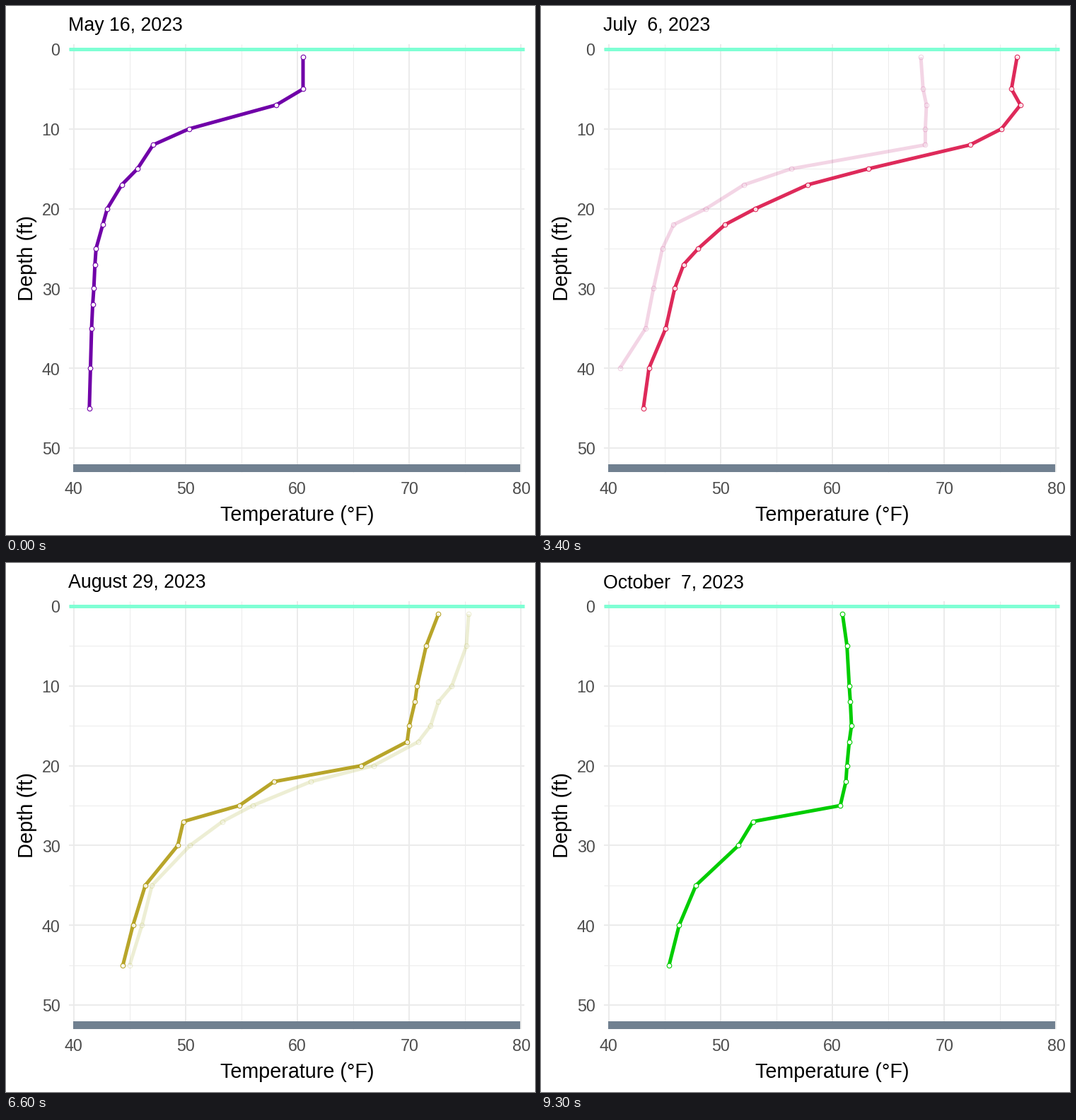
Animation of 748 by 748 pixels, one loop 10000 ms. Source, as a matplotlib script:

```python
import matplotlib.pyplot as plt
from matplotlib.animation import FuncAnimation
from matplotlib.patches import Rectangle

SIZE, DPI = 748, 100
PT = 72 / DPI  # points per pixel
plt.rcParams["font.family"] = "Liberation Sans"

GRID, TICK = "#EBEBEB", "#4D4D4D"
LEFT, RIGHT, TOP, BOTTOM = 89, 733.5, 54, 659

DEPTHS = [1, 5, 7, 10, 12, 15, 17, 20, 22, 25, 27, 30, 32, 35, 40, 45]
NA = None

# date, line colour, temperature at each depth
PROFILES = [
    ("May 16, 2023", "#7000A8",
     [60.5, 60.5, 58.1, 50.3, 47.1, 45.7, 44.3, 43.0,
      42.6, 42.0, 41.9, 41.8, 41.7, 41.6, 41.5, 41.4]),
    ("June  1, 2023", "#9A0088",
     [70.6, 70.7, 70.1, 65.8, 59.3, 52.8, 48.9, 44.8,
      45.1, 43.7, NA, 42.8, NA, 42.5, 42.2, 42.0]),
    ("June 15, 2023", "#B80066",
     [67.9, 68.1, 68.4, 68.3, 68.3, 56.3, 52.1, 48.7,
      45.8, 44.8, NA, 44.0, NA, 43.3, 41.0, NA]),
    ("July  6, 2023", "#D8003A",
     [76.5, 76.0, 76.8, 75.1, 72.3, 63.2, 57.8, 53.1,
      50.4, 48.0, 46.7, 45.9, NA, 45.1, 43.6, 43.1]),
    ("July 26, 2023", "#E83C00",
     [79.9, 78.3, NA, 75.4, 73.7, 71.4, 66.9, 58.1,
      52.7, 49.7, 47.9, 47.2, NA, 45.6, 44.6, 43.9]),
    ("August 29, 2023", "#AA9400",
     [72.6, 71.5, NA, 70.7, 70.5, 70.0, 69.8, 65.7,
      57.9, 54.8, 49.8, 49.3, NA, 46.4, 45.3, 44.4]),
    ("September  5, 2023", "#989F00",
     [75.3, 75.1, NA, 73.8, 72.6, 71.9, 70.8, 66.8,
      61.2, 56.0, 53.3, 50.4, NA, 47.0, 46.1, 45.0]),
    ("September 27, 2023", "#50BE00",
     [64.2, 64.5, NA, 64.7, 64.7, 64.7, 64.7, 64.5,
      63.6, 57.9, 54.8, 50.8, NA, 47.1, 45.7, 44.5]),
    ("October  7, 2023", "#00CD00",
     [60.9, 61.3, NA, 61.5, 61.6, 61.7, 61.5, 61.3,
      61.2, 60.7, 52.9, 51.6, NA, 47.8, 46.3, 45.4]),
]

# first frame and number of steps of each cross-fade
FADES = [(6, 6), (18, 6), (30, 6), (42, 6), (54, 6), (66, 6), (78, 5), (89, 5)]


def px(temp):
    return 95.7 + 15.82 * (temp - 40)


def py(depth):
    return 61 + 11.28 * depth


def curve(temps):
    pairs = [(px(t), py(d)) for t, d in zip(temps, DEPTHS) if t is not None]
    return zip(*pairs)


fig = plt.figure(figsize=(SIZE / DPI, SIZE / DPI), dpi=DPI, facecolor="white")
ax = fig.add_axes([0, 0, 1, 1])
ax.set_xlim(0, SIZE)
ax.set_ylim(SIZE, 0)
ax.axis("off")


def rule(xs, ys, width, color, z):
    ax.plot(xs, ys, color=color, lw=width * PT, zorder=z,
            solid_capstyle="butt")


def label(x, y, text, size, color="black", **kw):
    return ax.text(x, y, text, fontsize=size * PT, color=color,
                   va="baseline", **kw)


# grid and tick labels
for temp in range(40, 81, 5):
    major = temp % 10 == 0
    rule([px(temp)] * 2, [TOP, BOTTOM], 2 if major else 1, GRID, 1)
    if major:
        label(px(temp), 690, str(temp), 23.3, TICK, ha="center")
for depth in range(0, 51, 5):
    major = depth % 10 == 0
    rule([LEFT, RIGHT], [py(depth)] * 2, 2 if major else 1, GRID, 1)
    if major:
        label(76.5, py(depth) + 9.3, str(depth), 23.3, TICK, ha="right")

# water surface and lake bed
rule([LEFT, RIGHT], [py(0)] * 2, 5, "#7FFFD4", 3)
ax.add_patch(Rectangle((95.5, 648), 631.5, 10.5, color="#708090", lw=0,
                       zorder=3))

label(412, 728, "Temperature (°F)", 28.8, ha="center")
ax.text(38, 356.5, "Depth (ft)", fontsize=29 * PT, rotation=90,
        rotation_mode="anchor", ha="center", va="baseline")
date = label(88.5, 35, "", 26.7, ha="left")


def make_profile(z):
    line, = ax.plot([], [], lw=5 * PT, zorder=z, solid_capstyle="butt",
                    solid_joinstyle="round")
    dots, = ax.plot([], [], ls="none", marker="o", ms=6.6 * PT,
                    mew=1.1 * PT, mfc="white", zorder=z + 2)
    return line, dots


leaving, arriving = make_profile(4), make_profile(5)


def show(artists, index, alpha):
    _, color, temps = PROFILES[index]
    xs, ys = curve(temps)
    line, dots = artists
    line.set_color(color)
    dots.set_markeredgecolor(color)
    for artist in artists:
        artist.set_data(xs, ys)
        artist.set_alpha(alpha)
        artist.set_visible(alpha > 0)


def update(frame):
    index, mix = 0, 0.0
    for i, (start, steps) in enumerate(FADES):
        if frame >= start:
            index, mix = i, min((frame - start + 1) / steps, 1.0)
    show(leaving, index, 1 - mix)
    show(arriving, index + 1, mix)
    date.set_text(PROFILES[index + (mix >= 0.5)][0])
    return (*leaving, *arriving, date)


anim = FuncAnimation(fig, update, frames=100, interval=100, repeat=True,
                     repeat_delay=0, blit=False)
plt.show()
```
